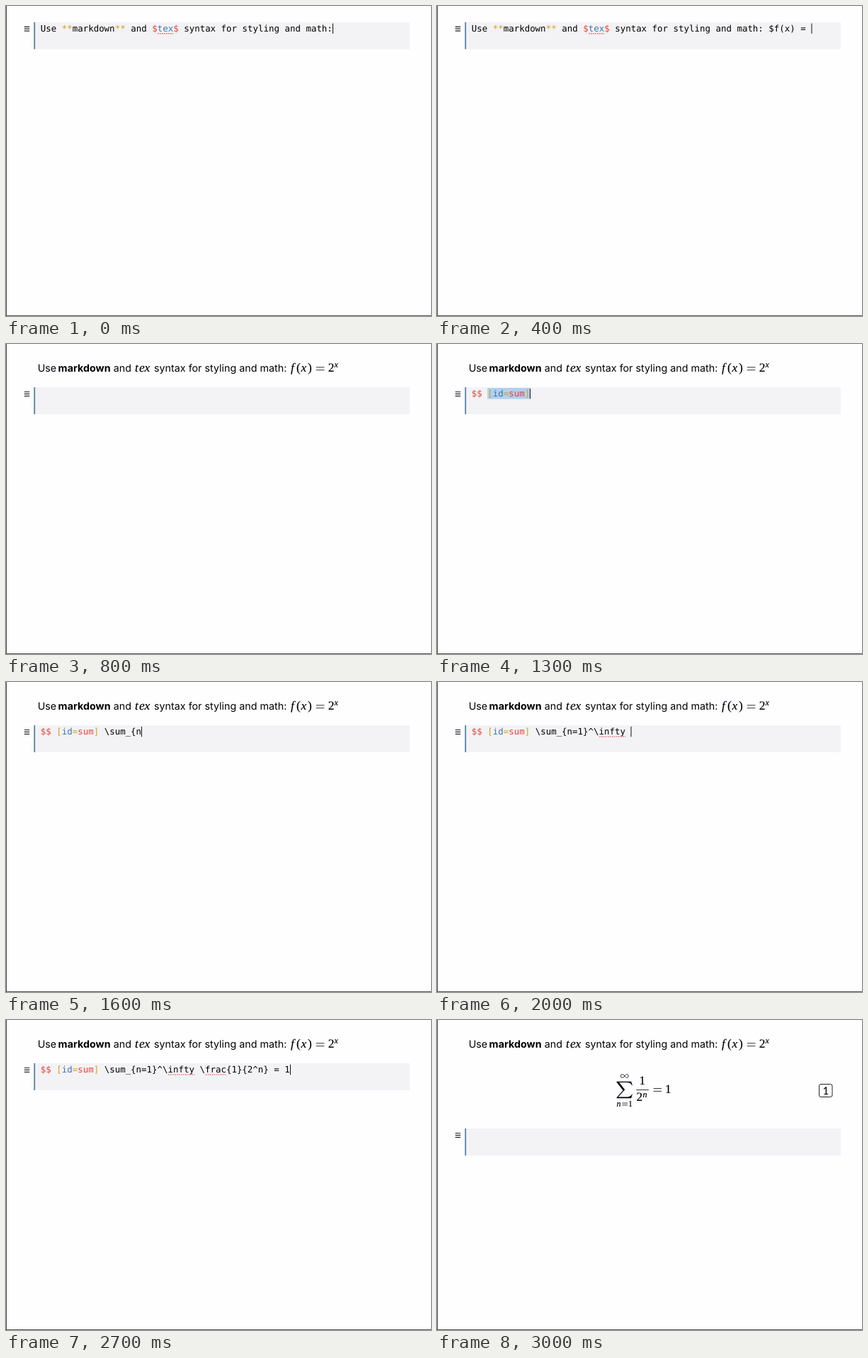
Animation of 600 by 437 pixels, one loop 3300 ms. Source, as an HTML page:

```html
<!DOCTYPE html>
<html lang="en">
<head>
<meta charset="utf-8">
<title>Markdown and TeX editor</title>
<style>
  html, body { margin: 0; width: 100%; height: 100%; overflow: hidden; background: #fefdff; }
  svg { display: block; width: 100%; height: 100%; text-rendering: geometricPrecision; }
  text { white-space: pre; fill: #000; }
  .code { font: 12.458px "DejaVu Sans Mono", monospace; }
  .prose { font: 14.3px Inter, sans-serif; }
  .bold { font-weight: 700; }
  .math { font: 17.4px "Liberation Serif", serif; stroke: #000; stroke-width: .15; }
  .it { font-style: italic; }
  .small { font-size: 12.2px; }
  .tag { font: 15px Lato, sans-serif; }
  .rule { stroke: #000; stroke-width: .8; fill: none; }
</style>
</head>
<body>
<svg viewBox="0 0 600 437">
  <rect width="600" height="437" fill="#fefdff"/>
  <g id="prose">
    <text class="prose" x="44.7" y="39">Use</text>
    <text class="prose bold" x="73.6" y="39">markdown</text>
    <text class="prose" x="151.8" y="39">and</text>
    <text class="prose" x="209" y="39">syntax for styling and math:</text>
    <g class="math">
      <text class="it" x="182 188 195.6" y="39">tex</text>
      <text class="it" x="402" y="39">f</text>
      <text x="410" y="39">(</text>
      <text class="it" x="416.6" y="39">x</text>
      <text x="426" y="39">)</text>
      <text x="454.7" y="39">2</text>
      <text class="it small" x="463.6" y="33">x</text>
    </g>
    <path class="rule" d="M437.8 32.8H449.4M437.8 36.7H449.4"/>
  </g>
  <g id="equation">
    <path d="M253.5 86.7H274.2L275.9 92.2H275.1C273.8 89 271.5 88 266.5 88H257.2L265.2 98.3L255.8 108.5H266C271.5 108.5 274 107.4 275.1 104.4H275.9L274.2 110.2H253.5V109.4L262.6 99.3L253.5 87.6Z"/>
    <path class="rule" d="M264.8 79C262.5 75.6 259.5 75.9 259.5 79S262.5 82.4 264.8 79S270.1 75.9 270.1 79S267.1 82.4 264.8 79"/>
    <path class="rule" d="M281.3 98.5H298.9M305.6 96.5H317M305.6 100.4H317M261.5 117.1H269.1M261.5 119.9H269.1"/>
    <g class="math">
      <text class="it small" x="253.6" y="122">n</text>
      <text class="small" x="269.9" y="122">1</text>
      <text x="285.6" y="91.4">1</text>
      <text x="281.6" y="113.8">2</text>
      <text class="it small" x="290.6" y="109">n</text>
      <text x="322" y="102.7">1</text>
    </g>
    <rect x="539.5" y="90.5" width="18.5" height="18" rx="2.5" fill="none" stroke="#222"/>
    <text class="tag" x="548.9" y="104.6" text-anchor="middle">1</text>
  </g>
  <g id="cell">
    <rect x="40" width="530" height="38" fill="#f3f2f4"/>
    <rect x="39.4" width="1.7" height="38" fill="#4c7ba0"/>
    <path d="M25.8 6.5H33.2M25.8 9.4H33.2M25.8 12.3H33.2" stroke="#222" stroke-width="1.2"/>
    <g id="code"></g>
  </g>
  <path d="M.5 0V437" stroke="#444"/>
  <path d="M0 436.5H600" stroke="#555"/>
</svg>
<script>
const LOOP = 3300, LEFT = 48.7, CHAR = 7.5;
const RED = "#e8403a", BLUE = "#3a76ab", GOLD = "#d3a01c";
const INLINE = "Use **markdown** and $tex$ syntax for styling and math: $f(x) = 2^x$";
const BLOCK = "$$ [id=sum] \\sum_{n=1}^\\infty \\frac{1}{2^n} = 1";
const ATTR = "[id=sum]";

// Characters typed at each 100 ms step from a start time
const inlineKeys = { from: 0, counts: [55, 57, 59, 61, 64, 66, 68] };
const blockKeys = {
  from: 900,
  counts: [2, 2, 5, 8, 11, 13, 16, 19, 22, 25, 27, 30, 33, 37, 39, 41, 43, 45, 47]
};

const el = id => document.getElementById(id);
const colX = col => LEFT + col * CHAR;

function typed({ from, counts }, t) {
  const step = Math.floor((t - from) / 100);
  return step < 0 ? 0 : counts[Math.min(step, counts.length - 1)];
}

function run(col, text, color = "#000") {
  const safe = text.replace(/&/g, "&amp;").replace(/</g, "&lt;");
  return `<text class="code" x="${colX(col)}" y="13.4" fill="${color}" style="fill:${color}">${safe}</text>`;
}

function squiggle(col, length) {
  return `<path d="M${colX(col) + .5} 16H${colX(col + length)}" stroke="#d8323c" stroke-width="1.2" stroke-dasharray="1.5 1.5"/>`;
}

function caret(col) {
  return `<rect x="${colX(col) - .2}" y="1.8" width="1" height="14.4" fill="#111"/>`;
}

// Colour rules: each returns [text, colour] pairs for one token
function paint(token) {
  if (token === "**") return [[token, GOLD]];
  if (token === "$$") return [[token, RED]];
  if (token === ATTR) return [["[", GOLD], ["id", BLUE], ["=", GOLD], ["sum", RED], ["]", GOLD]];
  if (/^\$.+\$$/.test(token)) return [["$", RED], [token.slice(1, -1), BLUE], ["$", RED]];
  return [[token]];
}

function highlight(line) {
  let col = 0, out = "";
  for (const token of line.split(/(\*\*|\$\$|\$[^$]+\$|\[id=sum\])/)) {
    for (const [text, color] of paint(token)) {
      if (text) out += run(col, text, color);
      col += text.length;
    }
  }
  return out;
}

function codeAt(t) {
  if (t < 800) {
    const n = typed(inlineKeys, t);
    return highlight(INLINE.slice(0, n)) + squiggle(22, 3) + (t < 700 ? caret(n) : "");
  }
  if (t < 900 || t >= 3000) return "";
  const n = typed(blockKeys, t);
  let out = "";
  if (n === 11) out += `<rect x="${colX(3)}" y="1" width="${ATTR.length * CHAR}" height="15.5" fill="#b1d0ee"/>`;
  out += highlight(BLOCK.slice(0, n));
  if (n >= 30) out += squiggle(24, 5);
  if (n >= 39) out += squiggle(31, 4);
  return out + (t < 2900 ? caret(n) : "");
}

function show(id, on) {
  el(id).setAttribute("visibility", on ? "visible" : "hidden");
}

let lastCode = null;
function draw(t) {
  const top = t < 800 ? 22.8 : t < 3000 ? 61 : 153;
  show("prose", t >= 800);
  show("equation", t >= 3000);
  el("cell").setAttribute("transform", `translate(0 ${top})`);
  const code = codeAt(t);
  if (code !== lastCode) el("code").innerHTML = lastCode = code;
}

const start = performance.now();
function tick() {
  draw((performance.now() - start) % LOOP);
  requestAnimationFrame(tick);
}
tick();
</script>
</body>
</html>
```
